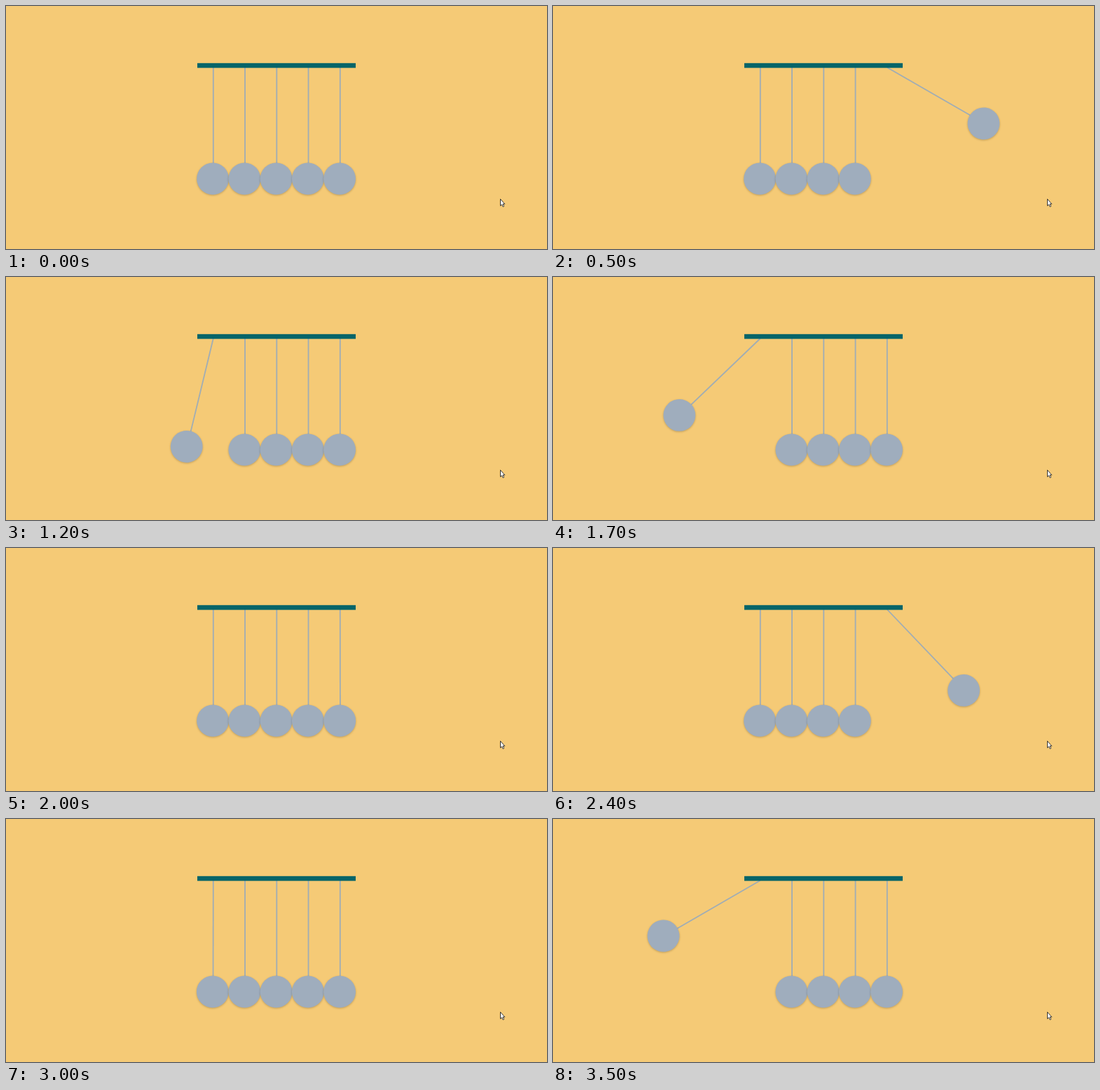
An HTML page with a canvas for the animation above (3600 ms loop, 772 by 348 pixels).

```html
<!DOCTYPE html>
<html lang="en">
<head>
<meta charset="utf-8">
<title>Newton's cradle</title>
<style>
  html, body { margin: 0; width: 100%; height: 100%; overflow: hidden; background: #f5ca76; }
  canvas { display: block; }
</style>
</head>
<body>
<canvas id="stage" width="772" height="348"></canvas>
<script>
const ctx = document.getElementById('stage').getContext('2d');
const LOOP = 3600, STEP = 100, SWING = 500, PEAK = 60;
const RATE = 1.005; // the swing runs slightly faster than the loop clock

// cubic-bezier(.42, 0, 1, 1), solved by bisection
function easeIn(x) {
  let lo = 0, hi = 1;
  for (let i = 0; i < 24; i++) {
    const s = (lo + hi) / 2, r = 1 - s;
    if (1.26 * r * r * s + 3 * r * s * s + s ** 3 < x) lo = s; else hi = s;
  }
  return lo * lo * (3 - 2 * lo);
}

// Right ball rises and falls, then the left one; every quarter eases in.
function pose(t) {
  const quarter = Math.floor(t / SWING) % 4;
  const e = easeIn(t % SWING / SWING);
  const angle = PEAK * (quarter % 2 ? 1 - e : e);
  return quarter < 2 ? [0, -angle] : [angle, 0];
}

function pendulum(x, degrees) {
  ctx.save();
  ctx.translate(x, 88);
  ctx.rotate(degrees * Math.PI / 180);
  ctx.fillStyle = '#a0adb5';
  ctx.fillRect(-0.9, 0, 1.8, 138);
  ctx.shadowColor = 'rgba(0, 0, 0, .22)';
  ctx.shadowBlur = 3;
  ctx.shadowOffsetY = 1;
  ctx.fillStyle = '#9fadbd';
  ctx.beginPath();
  ctx.arc(-0.7, 159.4, 22.9, 0, 2 * Math.PI);
  ctx.fill();
  ctx.restore();
}

const arrow = new Path2D('M705.5 276.5v9.6l2.1-1.9 1.5 3.3 1.6-.7-1.5-3.2h2.6z');

function draw() {
  const t = Math.floor((performance.now() + 1) % LOOP / STEP) * STEP;
  const [left, right] = pose(t * RATE);
  ctx.fillStyle = '#f5ca76';
  ctx.fillRect(0, 0, 772, 348);
  for (let i = 0; i < 5; i++) {
    pendulum(295.8 + 45.25 * i, i === 0 ? left : i === 4 ? right : 0);
  }
  ctx.fillStyle = '#036469';
  ctx.fillRect(273, 81.8, 226, 6.8);
  ctx.fillStyle = '#fff';
  ctx.fill(arrow);
  ctx.strokeStyle = '#222';
  ctx.lineWidth = 0.9;
  ctx.stroke(arrow);
  requestAnimationFrame(draw);
}
draw();
</script>
</body>
</html>
```
